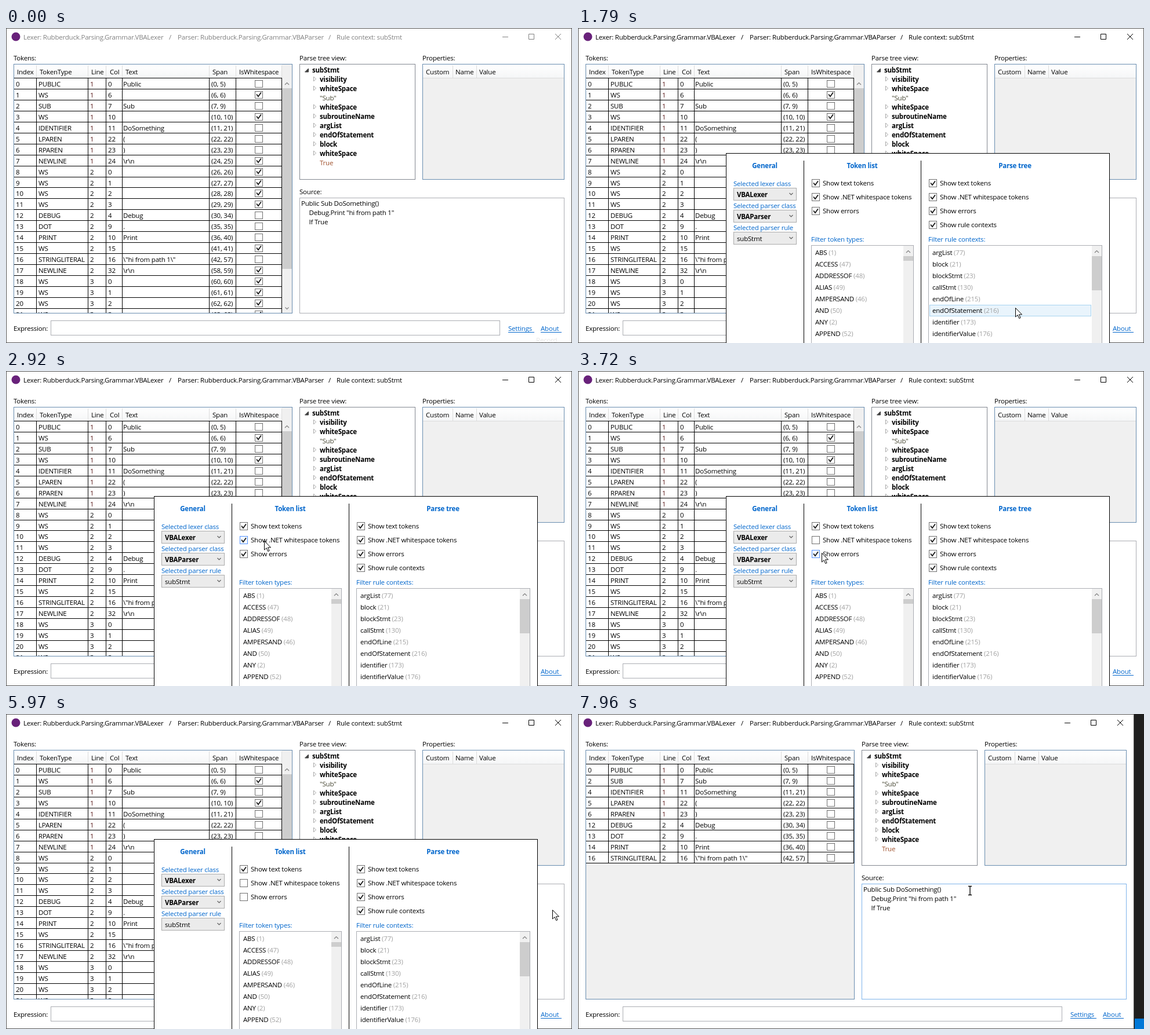
These frames come from a looping animation (976 px wide and 544 px high, 8 s). An HTML page:

```html
<!DOCTYPE html>
<html lang="en">
<head>
<meta charset="utf-8">
<title>Token viewer</title>
<style>
  html, body { margin: 0; width: 100%; height: 100%; overflow: hidden; background: #fff; }
  svg { display: block; }
  text { font: 11.5px "Open Sans", "Noto Sans", sans-serif; letter-spacing: -.2px; white-space: pre; }
  .bold { font-weight: 700; }
  .mid { text-anchor: middle; }
  .halo { mix-blend-mode: multiply; }
  rect { shape-rendering: crispEdges; }
</style>
</head>
<body>
<svg id="stage" width="976" height="544" viewBox="0 0 976 544"></svg>
<script>
const LOOP = 8000, BLUE = '#0066cc', STEEL = '#688caf', GRAY = '#abadb3';
const stage = document.getElementById('stage');

function el(parent, tag, attrs = {}) {
  const node = document.createElementNS('http://www.w3.org/2000/svg', tag);
  for (const key in attrs) node.setAttribute(key, attrs[key]);
  return parent.appendChild(node);
}
const group = parent => el(parent, 'g');
function text(parent, x, y, string, fill = '#000', cls = '') {
  const node = el(parent, 'text', { x, y, fill, class: cls });
  node.textContent = string;
  return node;
}
const fillRect = (parent, x, y, width, height, fill) => el(parent, 'rect', { x, y, width, height, fill });
const frame = (parent, x, y, width, height, stroke, fill = '#fff') =>
  el(parent, 'rect', { x: x + .5, y: y + .5, width: width - 1, height: height - 1, fill, stroke });
const path = (parent, d, stroke = '#000', width = 1, fill = 'none') =>
  el(parent, 'path', { d, stroke, 'stroke-width': width, fill });
const show = (node, on) => { node.style.display = on ? '' : 'none'; };

function checkbox(parent, x, y, checked, height = 14) {
  const box = frame(parent, x, y, 14, height, '#707070');
  const tick = path(parent, `M${x + 3} ${y + height - 7.5}l3 3.7l5 -7`, '#212121', 1.9);
  show(tick, checked);
  return { box, tick, x, y: y + height / 2 };
}
const arrowUp = (parent, x, y) => path(parent, `M${x - 3.5} ${y + 2}l3.5 -3.5l3.5 3.5`, '#808080', 1.2);
const arrowDown = (parent, x, y, color = '#606060') => path(parent, `M${x - 3} ${y - 1.5}l3 3l3 -3`, color, 1.2);

const shade = el(stage, 'linearGradient', { id: 'header', x2: 0, y2: 1 });
el(shade, 'stop', { 'stop-color': '#fff' });
el(shade, 'stop', { offset: 1, 'stop-color': '#f5f6f7' });

// Window
const win = group(stage);
fillRect(win, 0, 0, 976, 544, '#fff');
el(win, 'circle', { cx: 17, cy: 15, r: 7.5, fill: '#68217a' });
const titles = [
  [30, 'Lexer: Rubberduck.Parsing.Grammar.VBALexer'], [281, '/'],
  [296, 'Parser: Rubberduck.Parsing.Grammar.VBAParser'], [556, '/'],
  [570, 'Rule context: subStmt'],
].map(([x, s]) => text(win, x, 20, s));
text(win, 13, 56, 'Tokens:');
text(win, 13, 523, 'Expression:');
const input = frame(win, 77, 505, 775, 26, GRAY);

// Token table
const columns = [52, 141, 172, 200, 350, 396, 475];
const tokens = [
  ['PUBLIC', 'Public'], ['WS', ' '], ['SUB', 'Sub'], ['WS', ' '], ['IDENTIFIER', 'DoSomething'],
  ['LPAREN', '('], ['RPAREN', ')'], ['NEWLINE', '\r\n'],
  ...Array(4).fill(['WS', ' ']), ['DEBUG', 'Debug'], ['DOT', '.'], ['PRINT', 'Print'], ['WS', ' '],
  ['STRINGLITERAL', '"hi from path 1"'], ['NEWLINE', '\r\n'], ...Array(4).fill(['WS', ' ']),
];
let offset = 0, line = 1, lineStart = 0;
const rows = tokens.map(([type, source], index) => {
  const blank = type === 'WS' || type === 'NEWLINE';
  const shown = source.trim() || type === 'NEWLINE' ? JSON.stringify(source).slice(1, -1) : '';
  const cells = [index, type, line, offset - lineStart, shown, `(${offset}, ${offset + source.length - 1})`];
  offset += source.length;
  if (type === 'NEWLINE') { line++; lineStart = offset; }
  return { cells, blank };
});

function tokenTable(list, width) {
  const g = group(win);
  frame(g, 13, 62, width, 431, STEEL, '#f0f0f0');
  fillRect(g, 14, 63, 462, 24, 'url(#header)');
  columns.forEach(x => fillRect(g, x, 64, 1, 22, '#dcdcdc'));
  ['Index', 'TokenType', 'Line', 'Col', 'Text', 'Span', 'IsWhitespace']
    .forEach((s, i) => text(g, [19, 58, 147, 179, 206, 356, 402][i], 80, s));
  const body = el(g, 'svg', { width: 976, height: 492 });
  const lineY = i => Math.round(86.25 + 18.92 * i);
  fillRect(body, 14, 87, 461, lineY(list.length) - 87, '#fff');
  list.forEach(({ cells, blank }, i) => {
    const y = lineY(i);
    cells.forEach((s, c) => text(body, [17, 56, 145, 176, 202, 354][c], y + 15, s, c === 2 && s === 1 ? '#5a1a1a' : '#000'));
    checkbox(body, 429, y + 4, blank, 13);
  });
  for (let i = 0; i <= list.length; i++) fillRect(body, 14, lineY(i), 462, 1, '#000');
  columns.forEach(x => fillRect(body, x, 87, 1, lineY(list.length) - 86, '#000'));
  return g;
}
const fullTable = tokenTable(rows, 481);
fillRect(fullTable, 476, 87, 17, 405, '#f0f0f0');
fillRect(fullTable, 476, 104, 17, 312, '#cdcdcd');
arrowUp(fullTable, 484.5, 96);
arrowDown(fullTable, 484.5, 484, '#808080');
const shortTable = tokenTable(rows.filter(r => !r.blank), 464);

// Panels that follow the right edge
const right = group(win);
const buttons = path(right, 'M856 15.5h10M901.5 10.5h9v9h-9zM947 10l10 10M957 10l-10 10');
text(right, 506, 56, 'Parse tree view:');
frame(right, 506, 62, 200, 200, '#828790');
path(right, 'M521.5 70v6h-6z', '#404040', 1, '#404040');
text(right, 528, 77, 'subStmt', '#000', 'bold');
['visibility', 'whiteSpace', '"Sub"', 'whiteSpace', 'subroutineName', 'argList', 'endOfStatement',
  'block', 'whiteSpace', 'True'].forEach((s, i) => {
  const y = 93 + i * 16, leaf = i === 2 || i === 9;
  text(right, 541, y, s, i === 9 ? '#a0522d' : i === 2 ? '#444430' : '#000', leaf ? '' : 'bold');
  if (!leaf) path(right, `M530.5 ${y - 9}v8l4 -4z`, '#a8a8a8', 1, '#fff');
});
text(right, 718, 56, 'Properties:');
frame(right, 718, 62, 245, 200, STEEL, '#f0f0f0');
fillRect(right, 719, 63, 243, 23, 'url(#header)');
fillRect(right, 719, 86, 243, 1, '#dcdcdc');
[770, 811].forEach(x => fillRect(right, x, 64, 1, 22, '#dcdcdc'));
['Custom', 'Name', 'Value'].forEach((s, i) => text(right, [724, 775, 816][i], 80, s));
text(right, 506, 287, 'Source:');
const sourceBox = frame(right, 506, 293, 457, 200, GRAY);
text(right, 509, 307, 'Public Sub DoSomething()');
text(right, 522.5, 323, 'Debug.Print "hi from path 1"');
text(right, 522.5, 339, 'If True');
function link(x, width, s) {
  const g = group(right);
  text(g, x, 523, s).removeAttribute('fill');
  el(g, 'rect', { x, y: 525, width, height: 1 });
  g.setAttribute('fill', BLUE);
  return g;
}
const settings = link(866, 45, 'Settings');
link(922, 36, 'About');
const ghost = text(win, 914, 543, 'Record', '#e6e6e6');

// Edge of the desktop and window outline
const desktop = group(win);
fillRect(desktop, 959, 0, 17, 544, '#1f1f1f');
fillRect(desktop, 960, 526, 16, 18, '#0078d7');
const outline = frame(win, 0, 0, 976, 544, '#555', 'none');

// Settings dialog
const dialog = group(stage);
frame(dialog, 255, 216, 662, 340, '#000');
[389, 591].forEach(x => fillRect(dialog, x, 229, 1, 315, '#000'));
[[322, 'General'], [490, 'Token list'], [753.5, 'Parse tree']]
  .forEach(([x, s]) => text(dialog, x, 242, s, BLUE, 'bold mid'));
[['lexer class', 'VBALexer'], ['parser class', 'VBAParser'], ['parser rule', 'subStmt']].forEach(([label, value], i) => {
  const y = 276 + i * 38;
  text(dialog, 268, y - 3, 'Selected ' + label, BLUE);
  frame(dialog, 268, y, 109, 22, '#acacac', '#ebebeb');
  text(dialog, 274, y + 16, value, '#000', i < 2 ? 'bold' : '');
  arrowDown(dialog, 367.5, y + 10.5);
});
const options = ['Show text tokens', 'Show .NET whitespace tokens', 'Show errors', 'Show rule contexts'];
const optionColumn = (x, count, end) => options.slice(0, count).map((s, i) => {
  text(dialog, x + 19, 272 + i * 24, s);
  return { ...checkbox(dialog, x, 261 + i * 24, true), end };
});
const leftChecks = optionColumn(403, 3, 580), rightChecks = optionColumn(605, 4, 904);
const checks = [...leftChecks, ...rightChecks];

function listBox(x, width, title, thumb, items) {
  text(dialog, x, 369, title, BLUE);
  frame(dialog, x, 375, width, 200, GRAY);
  const end = x + width - 18;
  const marker = frame(dialog, x + 2, 378, width - 21, 20, '#a8d4f0', '#e9f4fc');
  items.forEach(([name, count], i) => {
    const node = text(dialog, x + 7, 392 + i * 20, name + ' ');
    const tail = el(node, 'tspan', { fill: '#a0a0a0' });
    tail.textContent = `(${count})`;
  });
  fillRect(dialog, end, 376, 17, 168, '#f0f0f0');
  fillRect(dialog, end, 394, 17, thumb, '#cdcdcd');
  arrowUp(dialog, end + 8.5, 386);
  return { x, end, marker };
}
const lists = [
  listBox(402, 177, 'Filter token types:', 8, [['ABS', 1], ['ACCESS', 47], ['ADDRESSOF', 48], ['ALIAS', 49],
    ['AMPERSAND', 46], ['AND', 50], ['ANY', 2], ['APPEND', 52], ['ARRAY', 3]]),
  listBox(604, 300, 'Filter rule contexts:', 59, [['argList', 77], ['block', 21], ['blockStmt', 23], ['callStmt', 130],
    ['endOfLine', 215], ['endOfStatement', 216], ['identifier', 173], ['identifierValue', 176],
    ['individualNonEOFEndOfStatement', 217]]),
];

// Pointer shapes, hot spot at 0,0
const halo = el(stage, 'circle', { r: 11.5, fill: '#fff04a', class: 'halo' });
const pointer = group(stage);
const arrow = path(pointer, 'M.5 .5V16l3.6 -3.4l2.6 5.9l2.4 -1l-2.6 -5.7h5z', '#000', 1, '#fff');
const hand = path(pointer, 'M-1.5 1.5q1.5 -2 3 0v6q1.5 -1.5 3 .4q1.5 -1.2 2.8 .6q2.2 -.8 2.7 1.5v5l-2 3v3h-8.5v-3l-4.5 -6q-.5 -2.5 2 -1.8l1.5 1.8z', '#000', 1.2, '#fff');
const beam = path(pointer, 'M-3 -7.5h2.3l.7 .6l.7 -.6h2.3M0 -7V7M-3 7.5h2.3l.7 -.6l.7 .6h2.3', '#000', 1.3);

// Each move: start, end, steps, from, bend, to, easing power
const moves = [
  [320, 1060, 11, [925, 556], [905, 530], [888, 522], 1],
  [1720, 2460, 12, [888, 522], [583.5, 445.5], [481, 327], 1.5],
  [2530, 3060, 8, [481, 327], [458, 306], [441, 289], 1.5],
  [3570, 3720, 3, [441, 289], [428, 300], [420, 314], 1],
  [4060, 4060, 1, [420, 314], [420, 313], [420, 312], 1],
  [4780, 5570, 13, [420, 312], [680, 28], [867, 288], 1],
  [5640, 5970, 6, [867, 288], [905, 318], [942, 338], 1.5],
  [6230, 6230, 1, [942, 338], [943, 339], [944, 339], 1],
  [7620, 7960, 6, [944, 339], [840, 488], [676, 305], 1],
];
const clicks = [[980, 1200], [3400, 3560], [4060, 4390], [6230, 6430]];
const within = (t, [from, to]) => t >= from && t < to;

function pointerAt(t) {
  const [start, end, steps, a, b, c, power] = moves.filter(m => t >= m[0]).pop() || moves[0];
  if (t < start) return a;
  const step = end > start ? Math.floor((t - start) / (end - start) * (steps - 1) + .1) + 1 : steps;
  const s = 1 - (1 - Math.min(1, step / steps)) ** power;
  return a.map((v, i) => (1 - s) ** 2 * v + 2 * s * (1 - s) * b[i] + s * s * c[i]);
}

function render(t) {
  const [x, y] = pointerAt(t);
  const open = within(t, [1200, 6230]), narrow = t >= 6370, active = t >= 980;
  const pressed = clicks.some(c => within(t, c));
  const onLink = !open && t < 1200 && x > 866 && x < 911 && y < 527;

  titles.forEach(node => node.setAttribute('fill', active ? '#000' : '#808080'));
  buttons.setAttribute('stroke', active ? '#000' : '#808080');
  settings.setAttribute('fill', onLink ? '#f00' : BLUE);
  sourceBox.setAttribute('stroke', t >= 6230 ? '#7eb4ea' : GRAY);
  show(ghost, t < 70);
  show(fullTable, !narrow);
  show(shortTable, narrow);
  show(desktop, narrow);
  right.setAttribute('transform', `translate(${narrow ? -17 : 0} 0)`);
  input.setAttribute('width', narrow ? 757 : 774);
  outline.setAttribute('width', narrow ? 958 : 975);

  show(dialog, open);
  show(leftChecks[1].tick, t < 3560);
  show(leftChecks[2].tick, t < 4390);
  checks.forEach(c => {
    const over = x >= c.x && x < c.end && Math.abs(y - c.y) < 8;
    c.box.setAttribute('stroke', over ? pressed ? '#3c77dd' : '#5593ff' : '#707070');
    c.box.setAttribute('fill', over ? pressed ? '#d9ecff' : '#f3f9ff' : '#fff');
  });
  lists.forEach(l => {
    show(l.marker, t >= 1720 && x > l.x && x < l.end && y > 377);
    l.marker.setAttribute('y', 378.5 + Math.floor((y - 378) / 20) * 20);
  });

  const place = `translate(${Math.round(x)} ${Math.round(y)})`;
  pointer.setAttribute('transform', place);
  halo.setAttribute('transform', place);
  show(pointer, t >= 320);
  show(halo, pressed);
  show(hand, onLink);
  show(beam, t >= 6230);
  show(arrow, !onLink && t < 6230);
}

function tick() {
  render(performance.now() % LOOP);
  requestAnimationFrame(tick);
}
tick();
</script>
</body>
</html>
```
